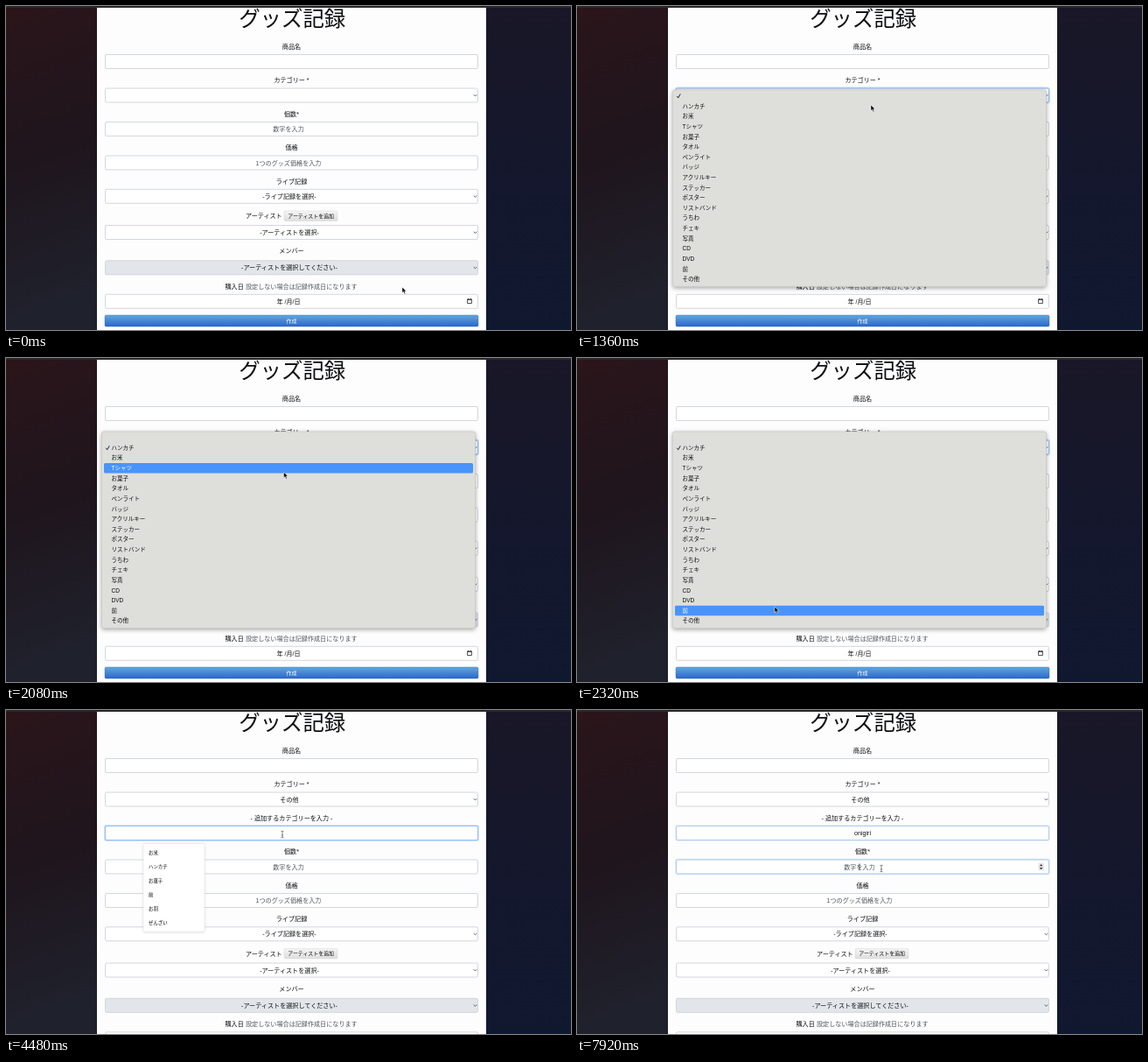
Animation, 646 px wide and 370 px high, one loop 8000 ms. Source, as an HTML page:

```html
<!DOCTYPE html>
<html lang="ja">
<head>
<meta charset="utf-8">
<title>グッズ記録</title>
<style>
html, body { margin: 0; width: 100%; height: 100%; overflow: hidden; background: #0c0d18; }
svg { display: block; width: 100vw; height: 100vh; }
text { font-family: "Liberation Sans", "Noto Sans CJK JP", "Noto Sans CJK", sans-serif; white-space: pre; }
</style>
</head>
<body>
<svg id="stage" viewBox="0 0 646 370">
  <defs>
    <linearGradient id="left" x2="0.1" y2="1">
      <stop offset="0" stop-color="#2a151a"/><stop offset=".5" stop-color="#1f151d"/><stop offset="1" stop-color="#1f222d"/>
    </linearGradient>
    <linearGradient id="right" x2="0" y2="1">
      <stop offset="0" stop-color="#191727"/><stop offset=".55" stop-color="#14172d"/><stop offset="1" stop-color="#10182f"/>
    </linearGradient>
    <linearGradient id="blue" x2="0" y2="1">
      <stop offset="0" stop-color="#62a8dc"/><stop offset="1" stop-color="#2b66cb"/>
    </linearGradient>
    <linearGradient id="grey" x2="0" y2="1">
      <stop offset="0" stop-color="#f4f4f4"/><stop offset="1" stop-color="#dedede"/>
    </linearGradient>
    <filter id="shade" x="-5%" y="-5%" width="110%" height="115%">
      <feDropShadow dx="0" dy="1.5" stdDeviation="2.5" flood-opacity=".35"/>
    </filter>
    <filter id="soft" x="-5%" y="-5%" width="110%" height="115%">
      <feDropShadow dx="0" dy="0.6" stdDeviation="0.8" flood-opacity=".2"/>
    </filter>
  </defs>
  <rect width="104" height="370" fill="url(#left)"/>
  <rect x="549" width="97" height="370" fill="url(#right)"/>
  <rect x="104" width="445" height="370" fill="#fdfdfe"/>
  <rect width="646" height="2" fill="#29292c"/>
</svg>
<script>
const NS = 'http://www.w3.org/2000/svg';
const stage = document.getElementById('stage');
const LOOP = 8000, SHIFT = 38.5, ROW = 11.62;
const INK = '#0c0e10', MUTED = '#50565d';

function add(parent, tag, attrs) {
  const el = document.createElementNS(NS, tag);
  for (const key in attrs) el.setAttribute(key, attrs[key]);
  return parent.appendChild(el);
}
const group = parent => add(parent, 'g', {});

function label(parent, str, x, cy, { size = 7.1, fill = INK, anchor = 'middle' } = {}) {
  const el = add(parent, 'text', { x, y: cy + size * 0.36, 'font-size': size, fill, 'text-anchor': anchor });
  el.textContent = str;
  return el;
}

function field(parent, cy, fill = '#fff') {
  const box = { x: 113.5, y: cy - 8, width: 426, height: 16, rx: 1.5 };
  add(parent, 'rect', { ...box, fill, stroke: '#ced3d8', 'stroke-width': 0.9 });
  const ring = group(parent);
  add(ring, 'rect', { x: 112.8, y: cy - 8.7, width: 427.4, height: 17.4, rx: 2.2, fill: 'none', stroke: '#0d6efd', 'stroke-opacity': 0.2, 'stroke-width': 1.5 });
  add(ring, 'rect', { ...box, fill: 'none', stroke: '#8dbafb', 'stroke-width': 0.8 });
  ring.setAttribute('opacity', 0);
  return ring;
}

function select(parent, cy, str, fill) {
  const ring = field(parent, cy, fill);
  add(parent, 'path', { d: `M534.7 ${cy - 0.8}l1.8 1.8 1.8-1.8`, fill: 'none', stroke: '#343a40', 'stroke-width': 0.8 });
  return { ring, text: label(parent, str, 324, cy) };
}

// Form
const form = group(stage);
label(form, 'グッズ記録', 327.2, 14.6, { size: 24.4 });
label(form, '商品名', 326.5, 46);
field(form, 63.5);
label(form, 'カテゴリー *', 326.5, 84.5);
const category = select(form, 102, '');

const extra = group(form);
label(extra, '- 追加するカテゴリーを入力 -', 326.5, 123);
const extraRing = field(extra, 140.5);
const typed = label(extra, '', 326.5, 140.5);

const lower = group(form);
label(lower, '個数*', 326.5, 123);
const countRing = field(lower, 140.5);
label(lower, '数字を入力', 323, 140.5, { fill: MUTED });
const spinner = group(lower);
add(spinner, 'rect', { x: 527.5, y: 136, width: 6.4, height: 9, rx: 1, fill: '#e6e6e8' });
add(spinner, 'path', { d: 'M528.9 139.8l1.8-2.3 1.8 2.3zM528.9 141.4l1.8 2.3 1.8-2.3z', fill: '#3c3c40' });
label(lower, '価格', 326.5, 161.5);
field(lower, 179);
label(lower, '1つのグッズ価格を入力', 323, 179, { fill: MUTED });
label(lower, 'ライブ記録', 326.5, 200);
select(lower, 217.3, '-ライブ記録を選択-');
label(lower, 'アーティスト', 274, 239.5, { anchor: 'start' });
add(lower, 'rect', { x: 318, y: 234, width: 61, height: 11.5, rx: 1.2, fill: 'url(#grey)', stroke: '#d2d2d4', 'stroke-width': 0.4 });
label(lower, 'アーティストを追加', 348.7, 239.6, { size: 5.95 });
select(lower, 258.5, '-アーティストを選択-');
label(lower, 'メンバー', 326.5, 279.7);
select(lower, 298.8, '-アーティストを選択してください-', '#e2e6ea');
label(lower, '購入日', 250.5, 320, { anchor: 'start' });
label(lower, '設定しない場合は記録作成日になります', 274, 320, { anchor: 'start', fill: MUTED });
field(lower, 337.3);
label(lower, '年 /月/日', 323, 337.3);
add(lower, 'path', { d: 'M527.6 335h4.8v4.6h-4.8zM527.4 335.3h5.2M528.6 334v1M531.4 334v1', fill: 'none', stroke: '#222', 'stroke-width': 0.8 });
add(lower, 'rect', { x: 113, y: 353, width: 427, height: 13, rx: 1.6, fill: 'url(#blue)', stroke: '#2f62b4', 'stroke-width': 0.4 });
label(lower, '作成', 326.5, 359.5, { size: 6, fill: '#fff' });

// Suggestions under the new category field
const hints = group(stage);
add(hints, 'rect', { x: 157, y: 152.5, width: 70, height: 100.5, rx: 1.5, fill: '#fff', stroke: '#dcdcde', 'stroke-width': 0.4, filter: 'url(#soft)' });
['お米', 'ハンカチ', 'お菓子', '前', 'お羽', 'ぜんざい'].forEach((s, i) =>
  label(hints, s, 163, 162.8 + i * 16.1, { size: 5.4, fill: '#000', anchor: 'start' }));

// Drop-down list, drawn with its top at zero
const menu = group(stage);
add(menu, 'rect', { x: 109.3, y: 0, width: 427.4, height: 224.6, rx: 2.8, fill: '#dedfdb', stroke: '#b4b5b2', 'stroke-width': 0.5, filter: 'url(#shade)' });
const bar = add(menu, 'rect', { x: 112, width: 422, height: ROW, rx: 1.5, fill: '#4994fa' });
const items = ['', 'ハンカチ', 'お米', 'Tシャツ', 'お菓子', 'タオル', 'ペンライト', 'バッジ', 'アクリルキー',
  'ステッカー', 'ポスター', 'リストバンド', 'うちわ', 'チェキ', '写真', 'CD', 'DVD', '前', 'その他']
  .map((s, i) => label(menu, s, 120.5, 6.9 + i * ROW, { size: 6.5, anchor: 'start' }));
const tick = add(menu, 'path', { d: 'M114.2 7.2l1.5 1.9 2.5-4.4', fill: 'none', stroke: INK, 'stroke-width': 0.9 });

const caret = add(stage, 'rect', { width: 0.6, height: 7.4, fill: '#222' });
const arrow = add(stage, 'path', { d: 'M0 0v6.6l1.5-1.4 1.1 2.5 1.2-.5-1.1-2.4h2z', fill: '#000', stroke: '#fff', 'stroke-width': 0.5 });
const beam = add(stage, 'path', { d: 'M-1.6-3.8q1.6 0 1.6 1v5.6q0 1-1.6 1M1.6-3.8q-1.6 0-1.6 1M1.6 3.8q-1.6 0-1.6-1M-.9 .9h1.8', fill: 'none', stroke: '#333', 'stroke-width': 0.6 });

// Timeline
const path = [ // time, x, y
  [80, 453, 321], [500, 348, 98], [820, 348, 98], [1120, 336, 113], [1440, 336, 113],
  [1680, 335, 101], [2000, 335, 101], [2320, 226, 284], [2600, 233, 298], [3000, 236, 298],
  [3200, 261, 279], [3320, 261, 279], [3840, 316, 142], [7360, 316, 142], [7800, 348, 181]
];
const menus = [
  { open: 560, click: 1360, fade: 1440, end: 1680, top: 95.8, checked: 0, pick: 1 },
  { open: 2000, click: 2960, fade: 3060, end: 3300, top: 84, checked: 1, pick: 18 }
];
const keys = [5440, 5760, 6000, 6160, 6480, 6600, 6720];

const clamp = v => Math.max(0, Math.min(1, v));
const show = (el, on) => el.setAttribute('display', on ? 'inline' : 'none');
const focus = (el, t, from, to) => el.setAttribute('opacity', clamp((t - from) / 150) - clamp((t - to) / 150));
const place = (el, x, y) => el.setAttribute('transform', `translate(${x} ${y})`);

function pointer(t) {
  const next = path.findIndex(p => p[0] > t);
  if (next < 1) return (next ? path[path.length - 1] : path[0]).slice(1);
  const [a, b] = [path[next - 1], path[next]];
  const u = (t - a[0]) / (b[0] - a[0]), k = u * u * (3 - 2 * u);
  return [a[1] + (b[1] - a[1]) * k, a[2] + (b[2] - a[2]) * k];
}

function drawMenu(t, y) {
  const m = menus.find(m => t >= m.open && t < m.end);
  show(menu, m);
  if (!m) return false;
  place(menu, 0, m.top);
  menu.setAttribute('opacity', 1 - clamp((t - m.fade) / (m.end - m.fade)));
  const hover = t < m.click ? Math.floor((y - m.top - 1.1) / ROW) : m.pick;
  const blink = t >= m.click && t < m.click + 70;
  const lit = hover > 0 && hover < items.length && !blink ? hover : -1;
  show(bar, lit > 0);
  bar.setAttribute('y', 1.1 + lit * ROW);
  items.forEach((el, i) => el.setAttribute('fill', i === lit ? '#fff' : INK));
  place(tick, 0, m.checked * ROW);
  tick.setAttribute('stroke', m.checked === lit ? '#fff' : INK);
  return true;
}

function draw(t) {
  const [x, y] = pointer(t);
  const open = drawMenu(t, y);
  const added = t >= 3360;

  category.text.textContent = t < 1420 ? '' : t < 3310 ? 'ハンカチ' : 'その他';
  show(extra, added);
  place(lower, 0, added ? SHIFT : 0);
  focus(category.ring, t, 560, 3920);
  focus(extraRing, t, 3920, 7840);
  focus(countRing, t, 7840, 9000);

  typed.textContent = 'onigiri'.slice(0, keys.filter(k => k <= t).length);
  show(hints, t >= 4080 && t < 5440);

  const numberY = added ? 179 : 140.5;
  const over = cy => Math.abs(y - cy) < 8.4;
  show(spinner, !open && (over(numberY) || t >= 7840));

  show(caret, t >= 7840);
  place(caret, 322.7, 175.3);

  const inText = !open && [63.5, 140.5, 179, added ? 217.5 : 179].some(over);
  const hidden = t >= 4800 && t < 7360;
  show(arrow, !inText && !hidden);
  show(beam, inText && !hidden);
  place(arrow, x, y);
  place(beam, x, y);
}

function tickFrame(now) {
  draw(now % LOOP);
  requestAnimationFrame(tickFrame);
}
draw(0);
requestAnimationFrame(tickFrame);
</script>
</body>
</html>
```
